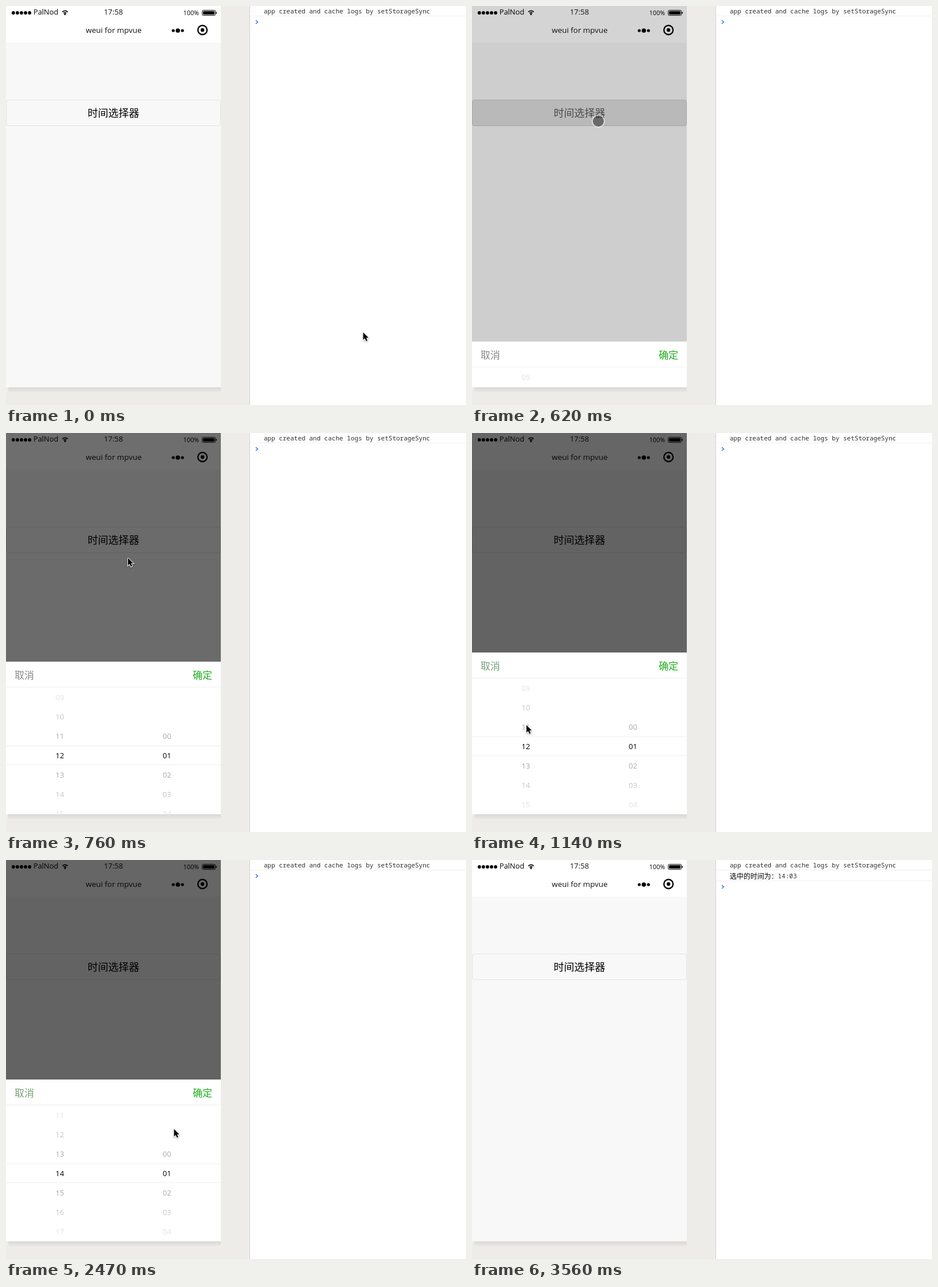
These frames come from a looping animation (803x698 px, 4.09 s). An HTML page with a canvas:

```html
<!DOCTYPE html>
<html lang="zh">
<head>
<meta charset="utf-8">
<title>Time picker</title>
<style>
html, body { margin: 0; width: 100%; height: 100%; overflow: hidden; background: #edece8; }
canvas { display: block; }
</style>
</head>
<body>
<canvas id="stage" width="803" height="698"></canvas>
<script>
const ctx = document.getElementById('stage').getContext('2d');
const LOOP = 4090;
const STEP = LOOP / 53, LEAD = 18; // the screen refreshes in even steps
const PHONE = { w: 375, h: 667 };
const SHEET = 283, ROW = 34;
const SANS = '"Open Sans", "Noto Sans", sans-serif';
const CJK = '"Noto Sans CJK SC", "Noto Sans CJK", sans-serif';
const MONO = '"Noto Sans Mono", "DejaVu Sans Mono", monospace';

const HOME = { x: 623.5, y: 571 };
const MOVES = [
  { from: 0, to: 360, x: 220, y: 201 },     // to the button
  { from: 690, to: 1130, x: 95, y: 511 },   // to the hours
  { from: 1230, to: 1450, x: 98, y: 399 },  // drag up
  { from: 1480, to: 1850, x: 258, y: 517 }, // to the minutes
  { from: 1850, to: 2080, x: 328, y: 527 },
  { from: 2080, to: 2350, x: 293, y: 530 },
  { from: 2350, to: 2620, x: 294, y: 343 }, // drag up
  { from: 2650, to: 3060, x: 335, y: 402 }  // to the confirm button
];

const lerp = (a, b, k) => a + (b - a) * k;
const clamp = k => Math.min(1, Math.max(0, k));
const smooth = k => k * k * (3 - 2 * k);

// cubic-bezier(.25, .1, .25, 1)
function ease(x) {
  let lo = 0, hi = 1;
  for (let i = 0; i < 20; i++) {
    const s = (lo + hi) / 2;
    if (0.75 * s * (1 - s) + s ** 3 < x) lo = s; else hi = s;
  }
  return 0.3 * lo * (1 - lo) ** 2 + 3 * lo * lo * (1 - lo) + lo ** 3;
}

function glide(t, start) {
  const k = clamp((t - start) / 300);
  return k % 1 ? ease(k) : k;
}

function pointerAt(t) {
  let { x, y } = HOME;
  for (const m of MOVES) {
    const k = smooth(clamp((t - m.from) / (m.to - m.from)));
    x = lerp(x, m.x, k);
    y = lerp(y, m.y, k);
  }
  return { x, y };
}

function rect(x, y, w, h, color) {
  ctx.fillStyle = color;
  ctx.fillRect(x, y, w, h);
}

function fade(x, y, w, h, top, bottom) {
  const g = ctx.createLinearGradient(0, y, 0, y + h);
  g.addColorStop(0, top);
  g.addColorStop(1, bottom);
  rect(x, y, w, h, g);
}

function text(str, x, y, font, color = '#000', align = 'left') {
  ctx.font = font;
  ctx.fillStyle = color;
  ctx.textAlign = align;
  ctx.fillText(str, x, y);
}

function dot(x, y, r, color = '#000') {
  ctx.fillStyle = color;
  ctx.beginPath();
  ctx.arc(x, y, r, 0, Math.PI * 2);
  ctx.fill();
}

function ring(x, y, r, width, color, from = 0, to = Math.PI * 2) {
  ctx.strokeStyle = color;
  ctx.lineWidth = width;
  ctx.beginPath();
  ctx.arc(x, y, r, from, to);
  ctx.stroke();
}

function line(points, width, color) {
  ctx.beginPath();
  points.forEach(([x, y]) => ctx.lineTo(x, y));
  ctx.strokeStyle = color;
  ctx.lineWidth = width;
  ctx.stroke();
}

function box(x, y, w, h, r, fill, stroke) {
  ctx.beginPath();
  ctx.roundRect(x, y, w, h, r);
  ctx.lineWidth = 1;
  if (fill) {
    ctx.fillStyle = fill;
    ctx.fill();
  }
  if (stroke) {
    ctx.strokeStyle = stroke;
    ctx.stroke();
  }
}

function statusBar() {
  for (let i = 0; i < 5; i++) dot(12.8 + i * 7.1, 12, 2.9);
  text('PalNod', 48, 15, '12.8px ' + SANS);
  for (const r of [3.4, 6.6]) ring(103, 15, r, 1.6, '#000', -Math.PI * 0.76, -Math.PI * 0.24);
  dot(103, 14.6, 1.5);
  text('17:58', 187.5, 15, '13px ' + SANS, '#111', 'center');
  text('100%', 337, 16, '10.8px ' + SANS, '#000', 'right');
  box(342.5, 7.5, 23, 9, 2, null, '#000');
  box(344, 9, 20, 6, 1, '#000');
  rect(366.5, 10.5, 1.5, 3, '#000');
}

function page(pressed) {
  rect(0, 0, PHONE.w, 64, '#fff');
  rect(0, 64, PHONE.w, PHONE.h - 64, '#f8f8f8');
  statusBar();
  text('weui for mpvue', 188, 47, '13.4px ' + SANS, '#111', 'center');
  for (const i of [-1, 0, 1]) dot(300 + i * 8, 43, i ? 2.6 : 3.8);
  ring(343, 42, 8, 2.3, '#000');
  dot(343, 42, 3.2);
  box(0.5, 164.5, 374, 45, 4, pressed ? '#dedede' : '#f8f8f8', pressed ? '#c9c9c9' : '#e3e3e3');
  text('时间选择器', 187.5, 194, '300 18px ' + CJK, pressed ? '#595959' : '#000', 'center');
}

function column(x, mid, value, count) {
  for (let n = 0; n < count; n++) {
    const y = mid + (n - value) * ROW;
    if (Math.abs(y - mid) < ROW * 4) {
      text(String(n).padStart(2, '0'), x, y + 5, '13px ' + SANS, '#000', 'center');
    }
  }
}

function sheet(top, hour, minute, settled) {
  const view = top + 45;
  const dense = 'rgba(255,255,255,.95)', thin = 'rgba(255,255,255,.6)';
  rect(0, top, PHONE.w, SHEET, '#fff');
  ctx.save();
  ctx.beginPath();
  ctx.rect(0, view, PHONE.w, 238);
  ctx.clip();
  column(94, top + 164, hour, 24);
  column(281, top + 164, minute, 60);
  fade(0, view, PHONE.w, 102, dense, thin);
  fade(0, view + 136, PHONE.w, 102, thin, dense);
  ctx.restore();
  for (const y of [44, 147, 180]) rect(0, top + y, PHONE.w, 1, '#f0f0f0');
  text('取消', 15, top + 29.5, '300 17px ' + CJK, settled ? '#74a074' : '#888');
  text('确定', 360, top + 29.5, '17px ' + CJK, '#1aad19', 'right');
}

function consolePane(logged) {
  const y = logged ? 47 : 28;
  rect(425, 0, 1, 698, '#d2d2d2');
  rect(426, 0, 377, 698, '#fff');
  text('app created and cache logs by setStorageSync', 450, 13, '11px ' + MONO, '#303030');
  rect(426, 17, 377, 1, '#f0f0f0');
  if (logged) {
    text('选中的时间为：', 450, 32.5, '300 12px ' + CJK);
    text('14:03', 534, 32, '11px ' + MONO, '#303030');
    rect(426, 36, 377, 1, '#f0f0f0');
  }
  line([[436, y - 3], [439.5, y], [436, y + 3]], 1.6, '#2f7df0');
}

function arrow() {
  ctx.shadowColor = 'rgba(0,0,0,.35)';
  ctx.shadowBlur = 3;
  ctx.shadowOffsetY = 1;
  line([[0, 0], [0, 13], [3, 10.3], [5.2, 15.2], [7.4, 14.2], [5.3, 9.5], [9.2, 9.3], [0, 0]], 2, '#fff');
  ctx.shadowColor = 'transparent';
  ctx.fillStyle = '#000';
  ctx.fill();
}

function hand() {
  box(-4, 8, 5, 4, 2, '#fff', '#000');
  for (let i = 0; i < 4; i++) box(-1.5 + i * 2.8, i ? 4 + i * 0.7 : 0.5, 2.8, 10, 1.4, '#fff', '#000');
  box(-0.5, 9.5, 9.5, 7, 2, '#fff');
  line([[-3, 11.5], [0.5, 16.5], [8, 16.5], [9.7, 12]], 1, '#000');
}

function touch() {
  dot(0.5, 0.5, 9.7, 'rgba(0,0,0,.43)');
  ring(0.5, 0.5, 10.5, 1.8, 'rgba(255,255,255,.5)');
}

function pointer(t) {
  const { x, y } = pointerAt(t);
  ctx.save();
  ctx.translate(x, y);
  if (t > 2980) hand();
  else if (t < 700 && x < PHONE.w) touch();
  else arrow();
  ctx.restore();
}

function draw(t) {
  const open = glide(t, 541) - glide(t, 3230);
  const hour = 12 + 2 * glide(t, 1400);
  const minute = 1 + 2 * glide(t, 2490);

  rect(0, 0, 803, 698, '#edece8');
  fade(4, PHONE.h, PHONE.w - 4, 8, '#dad9d6', '#e7e6e2');

  ctx.save();
  ctx.beginPath();
  ctx.rect(0, 0, PHONE.w, PHONE.h);
  ctx.clip();
  page(t > 500 && t < 650);
  if (open > 0) {
    rect(0, 0, PHONE.w, PHONE.h, `rgba(0,0,0,${0.6 * open})`);
    sheet(Math.round(PHONE.h - SHEET * open), hour, minute, open === 1);
  }
  ctx.restore();

  consolePane(t > 3350);
  if (t < 3500) pointer(t);
}

const start = performance.now();
function tick(now) {
  const t = Math.max(0, now - start) % LOOP;
  draw(Math.max(0, Math.floor((t + LEAD) / STEP) * STEP - LEAD) % (LOOP - LEAD));
  requestAnimationFrame(tick);
}
draw(0);
requestAnimationFrame(tick);
</script>
</body>
</html>
```
